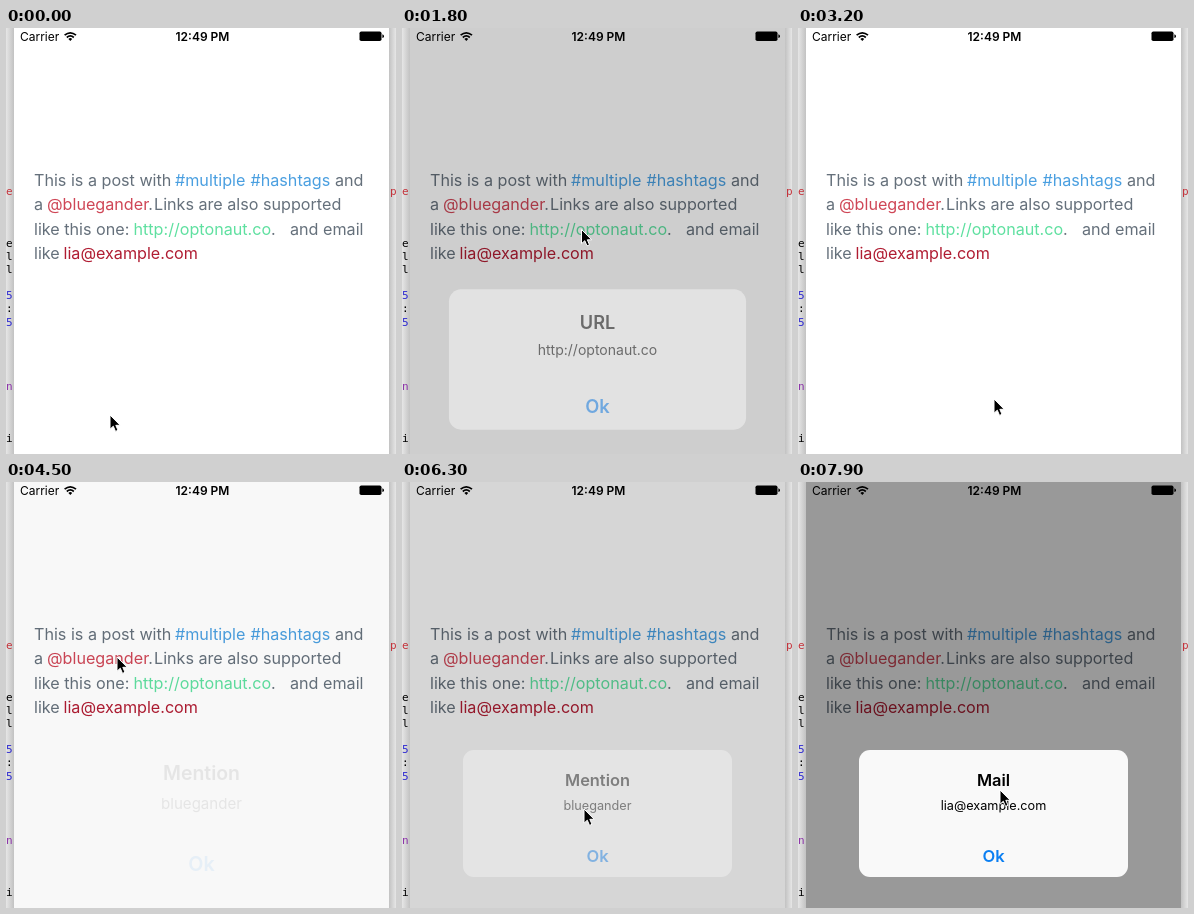
These frames come from a looping animation (390x426 px, 8 s). An HTML page:

```html
<!DOCTYPE html>
<html lang="en">
<head>
<meta charset="utf-8">
<title>Tappable post text</title>
<style>
  html, body { margin: 0; width: 100%; height: 100%; overflow: hidden; background: #fff; }
  svg { display: block; width: 100%; height: 100%; font-family: Inter, Roboto, sans-serif; }
  .code { font: 11px "DejaVu Sans Mono", monospace; }
  .string { fill: #c4323a; }
  .number { fill: #2f2bd0; }
  .keyword { fill: #8a2fa8; }
  .status { font-size: 12px; }
  .post { font-size: 16.15px; fill: #65707b; }
  .tag { fill: #4a9fe0; }
  .mention { fill: #cf4656; }
  .link { fill: #5fe0a0; }
  .mail { fill: #b01c32; }
  .bold { font-weight: 600; }
  .centered { text-anchor: middle; }
</style>
</head>
<body>
<svg viewBox="0 0 390 426" preserveAspectRatio="none">
  <defs>
    <linearGradient id="shadeLeft">
      <stop offset="0" stop-color="#e6e6e6"/>
      <stop offset="1" stop-color="#c2c2c2"/>
    </linearGradient>
    <linearGradient id="shadeRight">
      <stop offset="0" stop-color="#c2c2c2"/>
      <stop offset="1" stop-color="#e6e6e6"/>
    </linearGradient>
  </defs>

  <!-- editor window behind the phone -->
  <rect width="8" height="426" fill="url(#shadeLeft)"/>
  <rect x="383" width="7" height="426" fill="url(#shadeRight)"/>
  <g class="code">
    <text class="string" x="0" y="167">e</text>
    <text x="0" y="219">e</text>
    <text x="0" y="232">l</text>
    <text x="0" y="245">l</text>
    <text class="number" x="0" y="271">5</text>
    <text x="0" y="284">:</text>
    <text class="number" x="0" y="298">5</text>
    <text class="keyword" x="0" y="362">n</text>
    <text x="0" y="414">i</text>
    <text class="string" x="384" y="167">p</text>
  </g>

  <rect x="8" width="375" height="426" fill="#fff"/>

  <g class="post">
    <text y="158">
      <tspan x="28">This is a post with</tspan>
      <tspan x="169" class="tag">#multiple</tspan>
      <tspan x="244.5" class="tag">#hashtags</tspan>
      <tspan x="329">and</tspan>
    </text>
    <text y="182">
      <tspan x="28">a</tspan>
      <tspan x="41" class="mention">@bluegander</tspan><tspan>.</tspan>
      <tspan x="148">Links are also supported</tspan>
    </text>
    <text y="207">
      <tspan x="28">like this one:</tspan>
      <tspan x="127.5" class="link">http://optonaut.co</tspan><tspan>.</tspan>
      <tspan x="284">and email</tspan>
    </text>
    <text y="231">
      <tspan x="28">like</tspan>
      <tspan x="57.5" class="mail">lia@example.com</tspan>
    </text>
  </g>

  <rect id="dim" x="8" width="375" height="426" opacity="0"/>

  <g class="status">
    <text x="14" y="12.6">Carrier</text>
    <text class="bold centered" x="196.5" y="12.6">12:49 PM</text>
    <g fill="none" stroke="#000" stroke-width="1.7">
      <path d="M58.6 7.2Q64.3 2.4 70 7.2"/>
      <path d="M60.8 9.5Q64.3 6.4 67.8 9.5"/>
    </g>
    <path d="M62.4 10.9Q64.3 9.3 66.2 10.9L64.3 13Z"/>
    <rect x="353.5" y="3.5" width="22" height="9.5" rx="1.8"/>
    <path d="M376.4 6.3Q378 6.6 378 8.2T376.4 10.1Z"/>
  </g>

  <g id="alert" class="centered" opacity="0">
    <rect x="61" y="268" width="269" height="127" rx="11" fill="#f9f9f9"/>
    <text id="title" class="bold" x="195.5" y="303.5" font-size="16.4"></text>
    <text id="message" x="195.5" y="327.5" font-size="12.7"></text>
    <text class="bold" x="195.5" y="380" font-size="16.6" fill="#0b7ff2">Ok</text>
  </g>

  <path id="cursor" d="M0 0V14.2L3.3 11.2L5.5 16.4L8 15.3L5.8 10.3H10.2Z"
        stroke="#fff" stroke-width="1" stroke-linejoin="round"/>
</svg>

<script>
  const LOOP = 8000, TICK = 100;
  const el = id => document.getElementById(id);
  const dim = el('dim'), alertBox = el('alert'), cursor = el('cursor');

  // time, x, y
  const path = [
    [0, 104, 387], [200, 130, 372], [400, 196, 342], [600, 249, 305], [900, 197, 261],
    [1100, 157, 239], [1300, 164, 214], [1500, 178, 200], [1900, 180, 202],
    [2200, 218, 269], [2500, 204, 354], [2800, 196, 371], [3400, 196, 371],
    [3800, 150, 268], [4200, 111, 175], [4700, 111, 175], [5100, 147, 280],
    [5300, 186, 367], [5600, 196, 376], [6000, 196, 376], [6300, 182, 327],
    [6600, 150, 268], [7100, 118, 222], [7500, 118, 222], [7900, 202, 308]
  ];

  const popups = [
    { title: 'URL', message: 'http://optonaut.co', open: 1700, close: 2900, gone: 3200 },
    { title: 'Mention', message: 'bluegander', open: 4500, close: 6100, gone: 6500 },
    { title: 'Mail', message: 'lia@example.com', open: 7300, close: 9000, gone: 9400 }
  ];

  // smooth between the first and last pose of each segment
  function position(t) {
    const i = path.findIndex(p => p[0] > t);
    if (i < 0) return path[path.length - 1].slice(1);
    const a = path[i - 1], b = path[i];
    const k = (t - a[0]) / (b[0] - a[0]);
    return [1, 2].map(n => a[n] + (b[n] - a[n]) * k);
  }

  function fadeIn(age) {
    const k = Math.min(1, (age + 15) / 415);
    return 1 - (1 - k) ** 2;
  }

  function fadeOut(k) {
    return (1 - k) * (1 - 0.75 * k * k);
  }

  function draw(t) {
    const [x, y] = position(t);
    cursor.setAttribute('transform', `translate(${x} ${y})`);

    const popup = popups.find(p => t >= p.open && t < p.gone);
    let alpha = 0, scale = 1;
    if (popup) {
      alpha = fadeIn(t - popup.open);
      scale = 1.2 - 0.2 * alpha;
      if (t > popup.close) alpha = fadeOut((t - popup.close) / (popup.gone - popup.close));
      el('title').textContent = popup.title;
      el('message').textContent = popup.message;
    }
    dim.setAttribute('opacity', 0.4 * alpha);
    alertBox.setAttribute('opacity', alpha);
    alertBox.setAttribute('transform',
      `translate(195.5 331.5) scale(${scale}) translate(-195.5 -331.5)`);
  }

  const start = performance.now();
  function frame() {
    const t = (performance.now() - start) % LOOP;
    draw(Math.floor(t / TICK) * TICK);
    requestAnimationFrame(frame);
  }
  frame();
</script>
</body>
</html>
```
